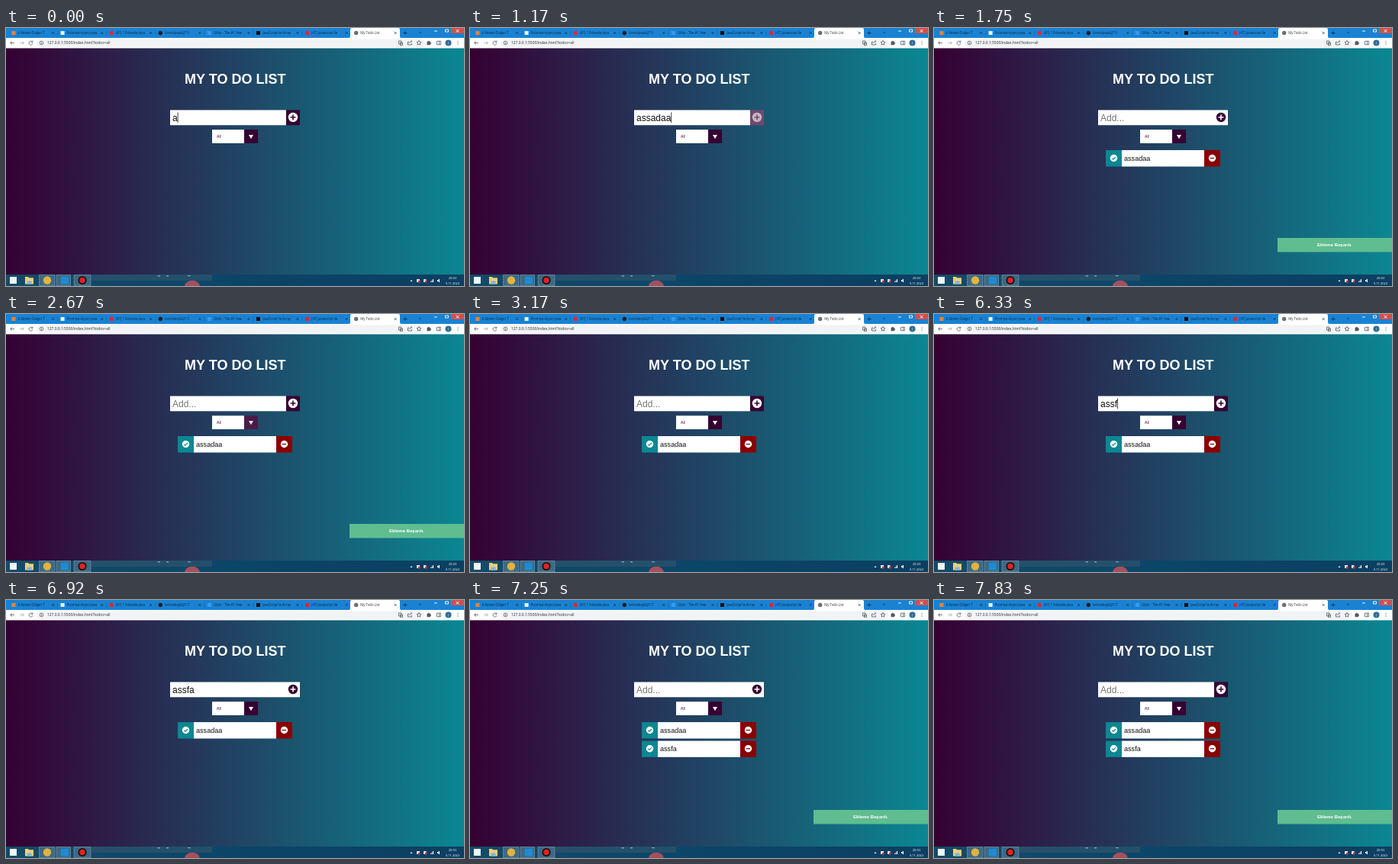
An HTML page that plays this animation: 600 by 338 pixels, repeating every 8 s.

```html
<!DOCTYPE html>
<html lang="en">
<head>
<meta charset="utf-8">
<title>My Todo List</title>
<style>
  html, body { margin: 0; width: 100%; height: 100%; overflow: hidden; background: #123; }
  svg { display: block; width: 100%; height: 100%; }
  text { white-space: pre; }
  .ui { font-family: "Open Sans", "Noto Sans", sans-serif; }
  .page { font-family: "Liberation Sans", Arial, sans-serif; }
  .dark { fill: #360033; }
  .light { fill: #fff; }
  .line { fill: none; stroke: #555a60; stroke-width: .8; }

  .add, .select, .toast, .task { animation: 8s infinite; }
  .add.dark { animation-name: add-lighten; }
  .add.light { animation-name: add-darken; }
  .select.dark { animation-name: select-lighten; }
  .select.light { animation-name: select-darken; }
  .toast { animation-name: toast; animation-timing-function: step-end; }
  .task { animation-timing-function: step-end; }
  .task.first { animation-name: first-task; }
  .task.second { animation-name: second-task; }

  @keyframes add-lighten {
    0%, 13.9%, 27.75%, 82%, 95%, 100% { fill: #360033; }
    17.65%, 24%, 85.75%, 91.25% { fill: #fff; }
  }
  @keyframes add-darken {
    0%, 13.9%, 27.75%, 82%, 95%, 100% { fill: #fff; }
    17.65%, 24%, 85.75%, 91.25% { fill: #360033; }
  }
  @keyframes select-lighten {
    0%, 37%, 100% { fill: #360033; }
    33.125% { fill: #360033; animation-timing-function: linear; }
    34.25% { fill: #90738f; }
  }
  @keyframes select-darken {
    0%, 37%, 100% { fill: #fff; }
    33.125% { fill: #fff; animation-timing-function: linear; }
    34.25% { fill: #a58ca3; }
  }
  @keyframes toast {
    0%, 39.5% { opacity: 0; }
    20.8%, 88.4%, 100% { opacity: 1; }
  }
  @keyframes first-task {
    0% { opacity: 0; }
    20.8%, 100% { opacity: 1; }
  }
  @keyframes second-task {
    0% { opacity: 0; }
    88.4%, 100% { opacity: 1; }
  }
</style>
</head>
<body>
<svg viewBox="0 0 600 338" preserveAspectRatio="none">
  <defs>
    <linearGradient id="backdrop">
      <stop stop-color="#360033"/><stop offset="1" stop-color="#0b8793"/>
    </linearGradient>
    <linearGradient id="bar">
      <stop stop-color="#164a68"/><stop offset=".5" stop-color="#0b4568"/><stop offset="1" stop-color="#0c3f62"/>
    </linearGradient>
  </defs>

  <!-- browser frame -->
  <g class="ui">
    <rect width="600" height="14" fill="#1a82d2"/>
    <path d="M449 13q2 0 2-2V2q0-2 2-2h61q2 0 2 2v9q0 2 2 2z" fill="#fff"/>
    <g id="tabs" font-size="4.4"></g>
    <path d="M520.500 6.500h5M523 4v5" class="line" style="stroke:#0d2b45"/>
    <path d="M541 5l1.500 1.500L544 5" class="line" style="stroke:#0d2b45"/>
    <rect x="583" width="17" height="7" fill="#d2504c"/>
    <path d="M561 4h4M575.500 2h4v3h-4zM589.500 2l4 3.500M593.500 2l-4 3.500" fill="none" stroke="#fff" stroke-width=".9"/>

    <rect y="13" width="600" height="14" fill="#fff"/>
    <rect x="40" y="14.500" width="508" height="10.500" rx="5.200" fill="#f1f3f4"/>
    <g class="line">
      <path d="M11 19.500H6M8 17.200L5.700 19.500 8 21.800"/>
      <path d="M18 19.500h5M21 17.200l2.300 2.300-2.300 2.300" stroke="#aaa"/>
      <path d="M34.500 18A2.500 2.500 0 1 0 35 20.300M35 16.500v2h-2"/>
      <circle cx="46.500" cy="19.500" r="2.300"/><path d="M46.500 19v1.800M46.500 17.900v.5"/>
      <path d="M514.500 17h3.500v4h-3.500zM516.500 19h3v3.500h-3z"/>
      <path d="M528 18h-1.500v4h5v-2M528.500 20q.5-2.500 3-2.500M530.500 16.300l1.300 1.200-1.300 1.200"/>
      <path d="M541 16.500l.9 1.900 2.100.2-1.600 1.400.5 2.100-1.900-1.100-1.900 1.100.5-2.100-1.600-1.400 2.100-.2z"/>
      <path d="M564.500 17.200h5v4.600h-5zM567.500 17.200v4.600"/>
    </g>
    <path d="M551.500 17.700h1.200a1 1 0 0 1 2 0h1.300v1.300a1 1 0 0 1 0 2v1.300h-4.500z" fill="#555a60"/>
    <circle cx="579.500" cy="19.500" r="4" fill="#2c6f9b"/>
    <text x="579.500" y="21" font-size="4" fill="#fff" text-anchor="middle">J</text>
    <g fill="#555a60"><circle cx="592" cy="17.500" r=".6"/><circle cx="592" cy="19.500" r=".6"/><circle cx="592" cy="21.500" r=".6"/></g>
    <text x="54" y="21.300" font-size="4.930" fill="#25282c">127.0.0.1:5500/index.html?todos=all</text>
  </g>

  <!-- page -->
  <g class="page">
    <rect y="26.500" width="600" height="297" fill="url(#backdrop)"/>
    <text x="300.300" y="73.300" font-size="18" font-weight="700" fill="#fff" text-anchor="middle">MY TO DO LIST</text>

    <rect x="215" y="107.500" width="152" height="19.800" fill="#fff"/>
    <text id="entry" x="218" y="121.500" font-size="12"></text>
    <rect id="caret" y="110.500" width=".8" height="13.500" fill="#111"/>
    <rect class="add dark" x="367" y="107.500" width="18" height="19.800"/>
    <circle class="add light" cx="376" cy="117" r="6.200"/>
    <path class="add dark" d="M375.200 113.600h1.600v2.600h2.600v1.600h-2.600v2.600h-1.600v-2.600h-2.600v-1.600h2.600z"/>

    <rect x="270" y="133.200" width="42" height="17.800" fill="#fff"/>
    <text x="276" y="144" font-size="5.200" fill="#360033">All</text>
    <rect class="select dark" x="312" y="133.200" width="18" height="17.800"/>
    <path class="select light" d="M318 140h6l-3 5.200z"/>

    <g id="tasks"></g>

    <g class="toast">
      <rect x="450" y="275" width="150" height="18.500" fill="#5fbd90"/>
      <text x="525" y="286" font-size="6" font-weight="700" fill="#fff" text-anchor="middle">Ekleme Başarılı.</text>
    </g>
  </g>

  <!-- taskbar -->
  <g class="ui">
    <rect y="323" width="600" height="15" fill="url(#bar)"/>
    <path d="M112 323h158v8H112z" fill="#2b536c" opacity=".75"/>
    <path d="M198.500 324h3.500v1.500h-3.500zM210 324h3v1.500h-3zM238 324h4v1.200h-4z" fill="#a9bac5" opacity=".7"/>
    <path d="M234 338a9.800 7 0 0 1 20 0z" fill="#a5505f"/>
    <g fill="#6f93a8" fill-opacity=".45" stroke="#8fabba" stroke-width=".5">
      <path d="M43.500 323.500h20.500v14.200H43.500zM66 323.500h18.500v14.200H66zM89 323.500h22v14.200H89z"/>
    </g>
    <rect x="5" y="326" width="9" height="9" fill="#eef6fb"/>
    <path d="M25 326h4l1 1.200h6v8.300H25z" fill="#edcf79"/>
    <path d="M27.500 331.500h6v4h-6z" fill="#7db7dc"/>
    <circle cx="54" cy="330.500" r="5.200" fill="#e3b33a"/>
    <rect x="72" y="325.500" width="10" height="10" fill="#1f8ad2"/>
    <circle cx="100" cy="330.500" r="5.600" fill="#151515"/>
    <circle cx="100" cy="330.500" r="3.700" fill="#e32222"/>

    <g fill="#fff">
      <path d="M529.500 332l1.500-2 1.500 2z"/>
      <path d="M538 329h4v4h-4zM547 329h3.500v4H547z" opacity=".85"/>
      <path d="M556 333h1v-1h-1zM557.500 333h1v-2.500h-1zM559 333h1v-4h-1z"/>
      <path d="M565 330h1.300l1.700-1.500v5l-1.700-1.500H565z"/>
      <g font-size="4.100" text-anchor="middle">
        <text x="585" y="329.300">20:03</text><text x="585" y="336.200">9.11.2022</text>
      </g>
    </g>
    <path d="M540 331h2.500v2.500H540zM549 331h2.500v2.500H549z" fill="#d83a35"/>
  </g>
</svg>

<script>
const byId = id => document.getElementById(id);

const tabs = [
  ["#f0812f", "A Kerem Dalgın T"],
  ["#e8f1fa", "Promise-Async-Java"],
  ["#dd2a2a", "(47) 1 Fidanda-Java"],
  ["#1b1f24", "lorendavpik27 F"],
  ["#3a9ae8", "Ublix - The #1 free"],
  ["#111", "JavaScript'te Array"],
  ["#dd2a2a", "(47) Javascript ile"],
  ["#6a7075", "My Todo List"]
];
byId("tabs").innerHTML = tabs.map(([color, title], i) => {
  const x = 7.5 + 64.1 * i;
  const active = i === tabs.length - 1;
  const ink = active ? "#333" : "#0d2b45";
  const icon = active || i === 3
    ? `<circle cx="${x + 2.5}" cy="6.5" r="2.7" fill="${color}"/>`
    : `<rect x="${x}" y="4" width="5" height="5" fill="${color}"/>`;
  const edge = i < 6 ? `<path d="M${x + 60} 3.500v6" stroke="#0f629f" stroke-width=".6"/>` : "";
  return `${icon}${edge}<text x="${x + 8}" y="8.100" fill="${ink}">${title}</text>
    <path d="M${x + 52.5} 5l3 3m0-3l-3 3" stroke="${ink}" stroke-width=".7"/>`;
}).join("");

const taskRow = (order, y, label) => `
  <g class="task ${order}" transform="translate(225 ${y})">
    <rect width="21" height="21.500" fill="#0b8793"/>
    <rect x="21" width="108" height="21.500" fill="#fff"/>
    <rect x="129" width="21" height="21.500" fill="#8b0000"/>
    <circle cx="10.500" cy="10.500" r="4.700" fill="#fff"/>
    <path d="M8.300 10.600l1.600 1.600 3-3.200" fill="none" stroke="#0b8793" stroke-width="1.100"/>
    <circle cx="139.500" cy="10.500" r="4.700" fill="#fff"/>
    <path d="M137 10.500h5" stroke="#8b0000" stroke-width="1.300"/>
    <text x="24" y="13.800" font-size="9.100" fill="#111">${label}</text>
  </g>`;
byId("tasks").innerHTML = taskRow("first", 160, "assadaa") + taskRow("second", 184.3, "assfa");

// [start in ms, typed text, caret shown]
const typing = [
  [0, "a", true], [170, "as", true], [250, "ass", true], [420, "assa", true],
  [500, "assad", true], [670, "assada", true], [830, "assadaa", true],
  [1400, "assadaa", false], [1665, "", false], [4670, "", true],
  [5250, "", false], [5580, "", true], [5750, "a", true], [5830, "as", true],
  [6000, "ass", true], [6250, "assf", true], [6500, "assfa", true],
  [6880, "assfa", false], [7075, "", false]
];
const entry = byId("entry");
const caret = byId("caret");
let shown;

function render(now) {
  const time = now % 8000;
  const state = typing.findLast(([start]) => start <= time);
  if (state !== shown) {
    const [, text, caretOn] = shown = state;
    entry.textContent = text || "Add...";
    entry.setAttribute("fill", text ? "#111" : "#757575");
    caret.setAttribute("x", 218 + (text ? entry.getComputedTextLength() : 0));
    caret.setAttribute("opacity", caretOn ? 1 : 0);
  }
  requestAnimationFrame(() => render(performance.now()));
}
render(0);
</script>
</body>
</html>
```
